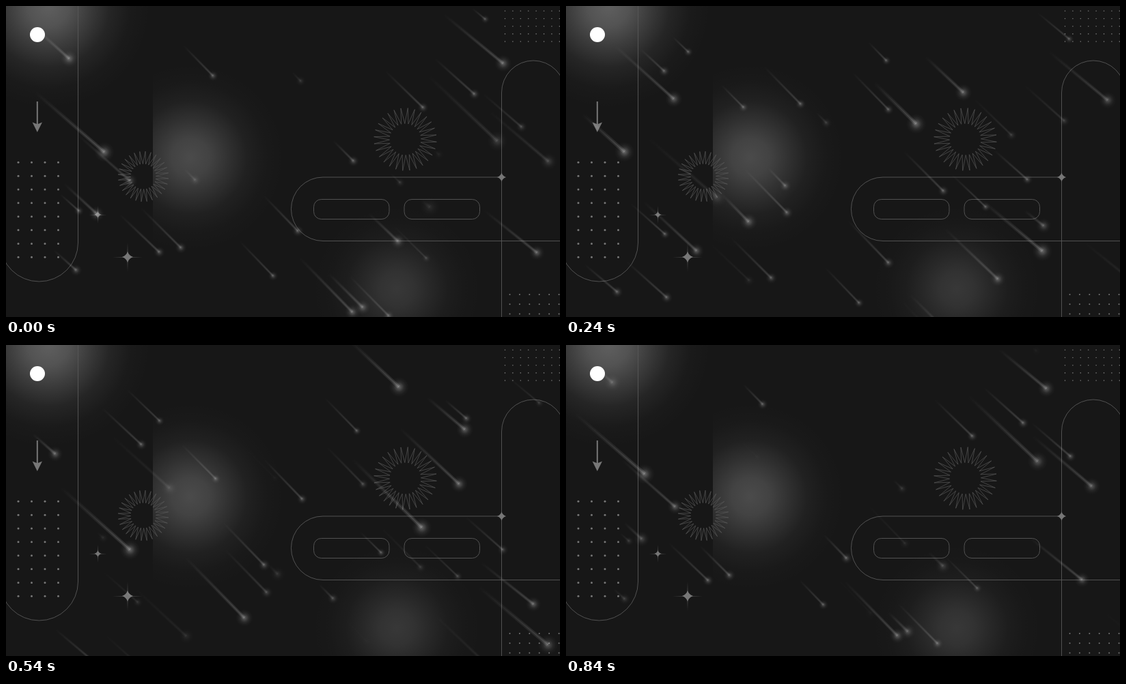
These frames come from a looping animation (811 by 456 pixels, 0.87 s). An HTML page with a canvas:

```html
<!DOCTYPE html>
<html lang="en">
<head>
<meta charset="utf-8">
<title>Meteor shower</title>
<style>
html, body { margin: 0; width: 100%; height: 100%; overflow: hidden; background: #171717; }
canvas { display: block; }
</style>
</head>
<body>
<canvas id="stage" width="811" height="456"></canvas>
<script>
const W = 811, H = 456, TAU = Math.PI * 2;
const LOOP = 870, STEP = 30, CYCLE = 990, LIFE = 800;
const LINE = '#585858', SOLID = '#777';
const stage = document.getElementById('stage').getContext('2d');
const backdrop = document.createElement('canvas');
backdrop.width = W;
backdrop.height = H;

// Bright meteors start at chosen points: [birth, x, y], by speed in px/ms.
const bright = {
  0.243: [[500, 388, 326], [420, 43, 134], [810, 89, 264], [830, 535, 308],
    [140, 675, 303], [540, 668, 274], [800, 476, 396]],
  0.272: [[110, 232, 280], [50, 530, 78], [350, 620, 80], [660, 638, 10], [830, 49, 38]],
  0.32: [[540, 0, 89], [60, 455, 116], [330, 508, -2], [60, 28, 162], [960, 611, 287]]
};

function seeded(seed) {
  return () => (seed = seed * 16807 % 2147483647) / 2147483647;
}

function makeMeteors() {
  const list = [];
  for (const [speed, starts] of Object.entries(bright))
    for (const [birth, x, y] of starts) list.push({ birth, x, y, speed: +speed });

  // Faint ones are spread evenly across the width and start at random times.
  const random = seeded(41), count = 25;
  for (let i = 0; i < count; i++)
    list.push({
      birth: random() * CYCLE,
      x: 20 + 680 * (i + random()) / count,
      y: random() * 400 - 10,
      speed: 0.145 + random() * 0.05
    });
  return list;
}

function radial(c, x, y, r, stops) {
  const g = c.createRadialGradient(x, y, 0, x, y, r);
  stops.forEach((a, i) => g.addColorStop(i / (stops.length - 1), `rgba(255,255,255,${a})`));
  c.fillStyle = g;
}

function glow(c, x, y, r, a, left = 0) {
  radial(c, x, y, r, [a, a * 0.83, a * 0.5, a * 0.2, a * 0.05, 0]);
  c.fillRect(Math.max(left, x - r), y - r, x + r - Math.max(left, x - r), 2 * r);
}

function disc(c, x, y, r) {
  c.beginPath();
  c.arc(x, y, r, 0, TAU);
  c.fill();
}

function dots(c, x0, y0, cols, rows, dx, dy, r) {
  for (let i = 0; i < cols; i++)
    for (let j = 0; j < rows; j++) disc(c, x0 + i * dx, y0 + j * dy, r);
}

function sunburst(c, x, y, outer, points) {
  c.beginPath();
  for (let i = 0; i < points * 2; i++) {
    const a = (i + 1) * Math.PI / points - Math.PI / 2 - 0.03;
    const r = i % 2 ? outer / 2 : outer;
    c.lineTo(x + r * Math.cos(a), y + r * Math.sin(a));
  }
  c.closePath();
  c.stroke();
}

// Four-pointed shape whose sides bend towards the middle by k.
function fourPoint(c, x, y, rx, ry, k) {
  c.beginPath();
  c.moveTo(x, y - ry);
  c.quadraticCurveTo(x + k, y - k, x + rx, y);
  c.quadraticCurveTo(x + k, y + k, x, y + ry);
  c.quadraticCurveTo(x - k, y + k, x - rx, y);
  c.quadraticCurveTo(x - k, y - k, x, y - ry);
  c.fill();
}

function sparkle(c, x, y, r, arm) {
  fourPoint(c, x, y, r, r, r * 0.25);
  fourPoint(c, x, y, arm, 0.6, 0.3);
  fourPoint(c, x, y, 0.6, arm, 0.3);
}

function drawBackdrop(c) {
  c.fillStyle = '#171717';
  c.fillRect(0, 0, W, H);
  glow(c, 62, 0, 150, 0.31);
  glow(c, 270, 222, 138, 0.225, 215);
  glow(c, 572, 415, 125, 0.14);

  c.strokeStyle = LINE;
  c.lineWidth = 0.9;
  const outlines = [
    'M105.5 0V347A57 57 0 0 1 -8.5 347',
    'M725.5 456V127A46.5 47 0 0 1 818.5 127',
    'M725.5 251H464A46.5 46.7 0 0 0 464 344.5H811'
  ];
  outlines.forEach(d => c.stroke(new Path2D(d)));
  for (const x of [450.5, 583]) {
    c.beginPath();
    c.roundRect(x, 283.5, 110.5, 29, 11);
    c.stroke();
  }
  c.lineWidth = 0.7;
  sunburst(c, 584.5, 195.5, 46, 28);
  sunburst(c, 201, 250, 37, 28);

  c.fillStyle = SOLID;
  dots(c, 18, 229.3, 4, 8, 19.5, 19.85, 1.5);
  dots(c, 730.5, 7.3, 8, 5, 11.4, 11.2, 0.8);
  dots(c, 737.5, 423, 6, 3, 14.4, 14.2, 1);
  sparkle(c, 178, 368, 8, 22);
  sparkle(c, 134.5, 306, 5, 13);
  sparkle(c, 725.5, 251, 6.5, 7);
  c.fill(new Path2D('M44.800 140h2v33l6.200-2.500-7.200 14.500-7.200-14.500 6.200 2.500z'));

  c.fillStyle = '#fff';
  disc(c, 46, 42, 11);
}

function drawMeteor(c, { birth, x: x0, y: y0, speed }, u) {
  const age = (u - birth + CYCLE) % CYCLE;
  if (age > LIFE) return;
  // Paths flatten towards the sides of the stage.
  const slope = 1.04 - 2e-6 * (x0 + speed * 400 - 420) ** 2;
  const run = age * speed, tail = Math.min(run + 4, speed * 320);
  const x = x0 + run, y = y0 + run * slope;
  const alpha = Math.min(1, age / 120, (LIFE - age) / 280) * (0.16 + speed * 0.6);

  const g = c.createLinearGradient(x - tail, y - tail * slope, x, y);
  g.addColorStop(0, 'rgba(255,255,255,0)');
  g.addColorStop(1, `rgba(255,255,255,${alpha * 0.35})`);
  c.strokeStyle = g;
  for (const width of [1 + speed * 14, 1 + speed * 3]) {
    c.lineWidth = width;
    c.beginPath();
    c.moveTo(x - tail, y - tail * slope);
    c.lineTo(x, y);
    c.stroke();
  }

  const r = speed * 46;
  radial(c, x, y, r, [alpha, alpha * 0.6, alpha * 0.25, alpha * 0.08, 0]);
  disc(c, x, y, r);
}

const meteors = makeMeteors();
drawBackdrop(backdrop.getContext('2d'));

function frame(now) {
  const t = Math.round(now / STEP) * STEP % LOOP;
  const u = t + Math.max(0, t - 690) * 0.4; // the shower speeds up near the end
  stage.drawImage(backdrop, 0, 0);
  for (const m of meteors) drawMeteor(stage, m, u);
  requestAnimationFrame(frame);
}
requestAnimationFrame(frame);
</script>
</body>
</html>
```
